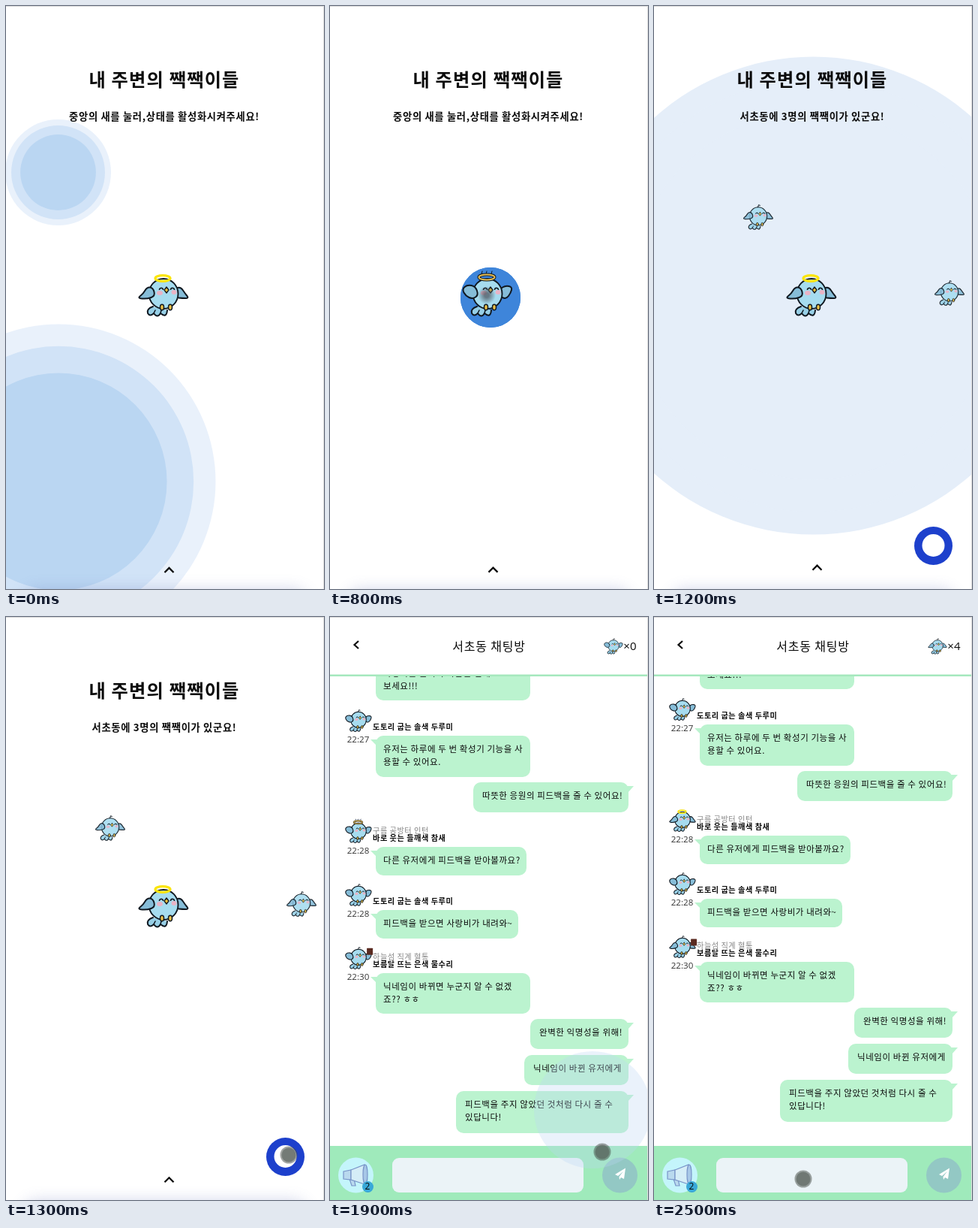
Animation, 424 px wide and 776 px high, one loop 2.6 s. Source, as an HTML page with a canvas:

```html
<!DOCTYPE html>
<html lang="ko">
<head>
<meta charset="utf-8">
<style>
  html, body { margin: 0; width: 100%; height: 100%; overflow: hidden; background: #fff; }
  canvas { display: block; width: 100vw; height: 100vh; }
</style>
</head>
<body>
<canvas id="stage" width="424" height="776"></canvas>
<script>
const ctx = document.getElementById('stage').getContext('2d');
const W = 424, H = 776, LOOP = 2600, STEP = 100;
const HANGUL = '"Noto Sans CJK KR", "Noto Sans CJK", "Noto Sans", sans-serif';
const LATIN = '"Open Sans", "Noto Sans", sans-serif';
const INK = '#0b0b0b', MINT = '#9feabb', BUBBLE = '#bbf3cf', WHITE = [255, 255, 255];

const clamp = v => Math.max(0, Math.min(1, v));
const lerp = (a, b, p) => a + (b - a) * p;
const blend = (a, b, p) => a.map((v, i) => lerp(v, b[i], p));
const rgb = c => `rgb(${c.map(Math.round).join(',')})`;
const easeOut = (p, n) => 1 - Math.pow(1 - p, n);

function disc(x, y, r, fill) {
  ctx.beginPath();
  ctx.arc(x, y, r, 0, Math.PI * 2);
  ctx.fillStyle = fill;
  ctx.fill();
}

function box(x, y, w, h, r, fill) {
  ctx.beginPath();
  ctx.roundRect(x, y, w, h, r);
  ctx.fillStyle = fill;
  ctx.fill();
}

function path(points, fill, stroke, width = 1) {
  ctx.beginPath();
  points.forEach(([x, y]) => ctx.lineTo(x, y));
  if (fill) { ctx.closePath(); ctx.fillStyle = fill; ctx.fill(); }
  if (stroke) { ctx.strokeStyle = stroke; ctx.lineWidth = width; ctx.stroke(); }
}

// Closed smooth outline through the midpoints of the given corners
function blob(points, fill, stroke, width) {
  const mid = (a, b) => [(a[0] + b[0]) / 2, (a[1] + b[1]) / 2];
  ctx.beginPath();
  ctx.moveTo(...mid(points[points.length - 1], points[0]));
  points.forEach((p, i) => ctx.quadraticCurveTo(...p, ...mid(p, points[(i + 1) % points.length])));
  ctx.closePath();
  ctx.fillStyle = fill;
  ctx.fill();
  ctx.strokeStyle = stroke;
  ctx.lineWidth = width;
  ctx.stroke();
}

function oval(x, y, rx, ry, turn, fill, stroke, width = 2) {
  ctx.beginPath();
  ctx.ellipse(x, y, rx, ry, turn, 0, Math.PI * 2);
  if (fill) { ctx.fillStyle = fill; ctx.fill(); }
  if (stroke) { ctx.strokeStyle = stroke; ctx.lineWidth = width; ctx.stroke(); }
}

function text(str, x, y, size, { weight = 500, color = INK, align = 'left', font = HANGUL } = {}) {
  ctx.font = `${weight} ${size}px ${font}`;
  ctx.letterSpacing = font === HANGUL ? `${size * 0.05}px` : '0px';
  ctx.textAlign = align;
  ctx.textBaseline = 'alphabetic';
  ctx.fillStyle = color;
  ctx.fillText(str, x, y + size * 0.38);
}

function bird(x, y, scale, up, { halo = false, book = false, alpha = 1 } = {}) {
  const line = '#101820', body = '#a6dcef', wing = '#86bdd8', tail = '#97cfe6';
  ctx.save();
  ctx.globalAlpha = alpha;
  ctx.translate(x, y);
  ctx.scale(scale, scale);
  ctx.lineJoin = ctx.lineCap = 'round';

  // Tail with scalloped edge
  ctx.beginPath();
  ctx.moveTo(-14, 15);
  ctx.quadraticCurveTo(-23, 18, -21, 24);
  ctx.quadraticCurveTo(-18, 29, -13, 24);
  ctx.quadraticCurveTo(-8, 31, -4, 24);
  ctx.quadraticCurveTo(4, 31, 5, 20);
  ctx.fillStyle = tail;
  ctx.fill();
  ctx.strokeStyle = line;
  ctx.lineWidth = 2;
  ctx.stroke();
  path([[-13, 24], [-11, 20]], null, line, 1.6);
  path([[-4, 24], [-3, 20]], null, line, 1.6);

  if (up) blob([[16, -8], [24, -13], [33, -11], [31, -3], [25, 5], [17, 2]], wing, line, 2);
  else blob([[15, -9], [23, -11], [29, -2], [34, 4], [25, 4], [16, 3]], wing, line, 2);
  oval(0, -2, 19.5, 20, 0, body, line, 1.9);
  if (up) blob([[-16, -12], [-27, -14], [-34, -8], [-29, 1], [-20, 5], [-12, 0]], wing, line, 2);
  else blob([[-14, -10], [-22, -11], [-27, -2], [-35, 4], [-22, 5], [-11, 1]], wing, line, 2);

  oval(-5, -3, 4, 3, 0, '#e9b4c6');
  oval(14, -4, 3.5, 3, 0, '#e9b4c6');
  ctx.strokeStyle = line;
  ctx.lineWidth = 1.7;
  for (const ex of [-3, 12]) {
    ctx.beginPath();
    ctx.arc(ex, -7, 2.6, Math.PI * 1.1, Math.PI * 1.9);
    ctx.stroke();
  }
  path([[4, -11], [7, -7], [4, -3], [1, -7], [4, -11]], '#e9bd3d', line, 1.3);
  for (const fx of [-2, 9]) oval(fx, 16, 2.5, 3.7, 0, '#edc349', line, 1.5);

  if (halo) {
    if (up) {
      for (const hx of [-8, -2, 5]) path([[hx, -28], [hx + 1, -32]], null, line, 1);
      oval(-1, -24, 10.5, 3.6, 0, null, line, 4);
      oval(-1, -24, 10.5, 3.6, 0, null, '#e6bd54', 2);
    } else {
      oval(-1, -22.5, 10, 3.8, 0, null, '#fbe50d', 3.2);
    }
  } else {
    path([[-1, -22], [1, -27], [4, -26]], null, line, 1.8);
  }
  if (book) box(21, up ? -25 : -20, 15, 17, 1, '#5a2a20');
  ctx.restore();
}

function cursor(x, y, soft) {
  if (soft) {
    const g = ctx.createRadialGradient(x, y, 3, x, y, 12);
    g.addColorStop(0, 'rgba(85,95,105,.8)');
    g.addColorStop(1, 'rgba(85,95,105,0)');
    disc(x, y, 12, g);
  } else {
    disc(x, y, 11.5, 'rgba(70,75,70,.5)');
    disc(x, y, 9.5, 'rgba(85,95,88,.6)');
  }
}

function rings(x, y, radii, colors) {
  radii.forEach((r, i) => disc(x, y, r, rgb(colors[i])));
}

// Home: ripples, title, birds nearby
const PALE = [[233, 241, 251], [209, 227, 247], [186, 214, 242]];
const VIVID = [[196, 219, 243], [130, 182, 229], [76, 148, 221]];
const SPARK = [62, 133, 218], MIST = [229, 238, 249];

function idleRipples(t) {
  const p = clamp(t / 600);
  if (p >= 1) return;
  const colors = PALE.map(c => blend(c, WHITE, p));
  const big = 209.5 + 18 * p, small = 70.5 + 53 * p;
  rings(70, 633, [big, big * 0.86, big * 0.69], colors);
  rings(69.5, 221.5, [small, small * 0.886, small * 0.715], colors);
}

function activeRipple(t) {
  if (t < 800 || t >= 1300) return;
  const p = clamp((t - 800) / 400);
  const radii = [[278, 2.42], [248, 1.92], [205, 1.43]].map(([d, n]) => 40 + d * easeOut(p, n));
  const colors = VIVID.map(c => t < 1000
    ? blend(SPARK, c, (t - 800) / 200)
    : blend(c, MIST, clamp((t - 1000) / 200)));
  const drift = clamp(p * 2);
  rings(lerp(214, 212.5, drift), lerp(388, 385.5, drift), radii, colors);
}

function home(t) {
  idleRipples(t);
  activeRipple(t);

  const shown = clamp((t - 850) / 350);
  const up = Math.floor((t + 150) / 300) % 2 === 1;
  const heading = { weight: 700, align: 'center' };
  text('내 주변의 짹짹이들', 211, 97.5, 24.2, heading);
  text(t < 900 ? '중앙의 새를 눌러,상태를 활성화시켜주세요!' : '서초동에 3명의 짹짹이가 있군요!',
    211, 146.5, 13.3, heading);

  if (shown > 0) {
    bird(139, 281, 0.6, false, { alpha: shown * 0.9 });
    bird(394, 382, 0.6, false, { alpha: shown * 0.9 });
    ctx.globalAlpha = shown * shown;
    disc(372.5, 718.5, 25.5, '#1d40cc');
    disc(372.5, 718, 15, '#fff');
    ctx.globalAlpha = 1;
  }
  bird(210, 385, 1, up, { halo: true });
  if (t >= 700 && t < 1100) cursor(209, 385, true);
  if (t >= 1300) cursor(377, 716);

  ctx.save();
  ctx.shadowColor = 'rgba(110,120,190,.32)';
  ctx.shadowBlur = 20;
  box(22, 777, 380, 40, 20, '#fff');
  ctx.restore();

  const cy = 749 - 2 * Math.cos((t - 1100) / 733 * Math.PI * 2);
  path([[211.5, cy + 3], [217.5, cy - 3], [223.5, cy + 3]], null, INK, 2.3);
}

// Chat room
const CHAT = [
  { y: 57, h: 54, w: 206, lines: ['확성기를 눌러서 마음을 전해', '보세요!!!'] },
  { y: 158, h: 55, w: 206, name: '도토리 굽는 솔색 두루미', time: '22:27',
    lines: ['유저는 하루에 두 번 확성기 기능을 사', '용할 수 있어요.'] },
  { y: 220, h: 40, w: 207, mine: true, lines: ['따뜻한 응원의 피드백을 줄 수 있어요!'] },
  { y: 306, h: 38, w: 201, name: '바로 웃는 들깨색 참새', rank: '구름 공방터 인턴', time: '22:28',
    look: { halo: true }, lines: ['다른 유저에게 피드백을 받아볼까요?'] },
  { y: 390, h: 38, w: 190, name: '도토리 굽는 솔색 두루미', time: '22:28',
    lines: ['피드백을 받으면 사랑비가 내려와~'] },
  { y: 474, h: 54, w: 206, name: '보름달 뜨는 은색 물수리', rank: '하늘섬 직계 혈통', time: '22:30',
    look: { book: true }, lines: ['닉네임이 바뀌면 누군지 알 수 없겠', '죠?? ㅎㅎ'] },
  { y: 535, h: 40, w: 131, mine: true, lines: ['완벽한 익명성을 위해!'] },
  { y: 583, h: 40, w: 139, mine: true, lines: ['닉네임이 바뀐 유저에게'] },
  { y: 631, h: 56, w: 230, mine: true, lines: ['피드백을 주지 않았던 것처럼 다시 줄 수', '있답니다!'] },
];

function message(m, up) {
  const x = m.mine ? 398 - m.w : 61;
  box(x, m.y, m.w, m.h, 10, BUBBLE);
  path(m.mine
    ? [[390, m.y + 5], [405, m.y + 5], [397, m.y + 14]]
    : [[54, m.y + 5], [68, m.y + 5], [62, m.y + 13]], BUBBLE);
  m.lines.forEach((s, i) => text(s, x + (m.mine ? 12 : 10), m.y + 18 + i * 17, 11.5));
  if (!m.name) return;
  bird(38, m.y - 20, 0.53, m.look ? up : true, m.look);
  if (m.rank) text(m.rank, 57, m.y - 22, 10.2, { color: '#858585' });
  text(m.name, 57, m.y - 11.5, 10.2, { weight: 700 });
  text(m.time, 37.5, m.y + 5, 11.6, { weight: 400, color: '#333', align: 'center', font: LATIN });
}

function megaphone() {
  const line = '#7894c8', fill = '#b9d9ee';
  path([[26, 748], [32, 748], [34, 757], [29, 757], [26, 748]], fill, line, 1.2);
  path([[18, 738], [28, 736], [28, 749], [18, 748], [18, 738]], fill, line, 1.2);
  path([[28, 736], [46, 729], [46, 755], [28, 749], [28, 736]], '#d5edf7', line, 1.2);
  oval(47, 742, 3, 13, 0, '#a7c7e7', line, 1.2);
}

function chat(t) {
  const up = Math.floor(t / 200) % 2 === 1;
  if (t >= 1700) {
    ctx.save();
    ctx.beginPath();
    ctx.rect(0, 78, W, 626);
    ctx.clip();
    ctx.translate(0, -15 * easeOut(clamp((t - 1900) / 400), 2));
    CHAT.forEach(m => message(m, up));
    ctx.restore();
  }

  box(0, 76.5, W, 2.5, 0, '#a5e8bd');
  path([[38, 32], [32.5, 37], [38, 42]], null, INK, 2.2);
  text('서초동 채팅방', 212, 38.5, 16, { align: 'center' });
  bird(378, 39, 0.38, up || t < 1700);
  text('×' + (t < 2300 ? 0 : 4), 408.5, 38, 15, { align: 'right', font: LATIN });

  box(0, 704, W, 72, 0, MINT);
  disc(34.5, 743, 23.5, '#c4f5fb');
  if (t >= 1700) megaphone();
  disc(50.5, 758.5, 7.5, '#39a8d8');
  text('2', 50, 757.5, 12, { weight: 400, align: 'center', font: LATIN });
  box(83, 720, 255, 46, 9, '#ebf3f7');
  disc(386.5, 743, 23.5, '#93c8c4');
  path([[394, 733.5], [380, 742], [384, 744], [391, 738], [385.5, 745], [386, 749], [388, 746], [392, 748]], '#fff');

  if (t >= 1800 && t < 2200) {
    const p = (t - 1800) / 400;
    const alpha = 0.3 * (1 - Math.max(0, p - 0.25) / 0.75);
    disc(350, 656, 48 + 57 * easeOut(p, 2.6), `rgba(185,213,242,${alpha})`);
  }
  const near = clamp((t - 1600) / 300), p = clamp((t - 1900) / 500), far = p * p * (3 - 2 * p);
  cursor(lerp(lerp(377, 363, near), 199, far), lerp(lerp(716, 712, near), 748, far));

  if (t < 1700) {
    box(-4, 760, 142, 24, 4, '#c3c8c8');
    box(-4, 761, 141, 24, 3, '#dfe1e5');
    text('api.pebbrin-tavolk.org...', 3, 771, 11.3, { weight: 400, color: '#4a4d50', font: LATIN });
  }
}

function draw(t) {
  ctx.globalAlpha = 1;
  ctx.lineJoin = 'miter';
  ctx.lineCap = 'butt';
  ctx.fillStyle = '#fff';
  ctx.fillRect(0, 0, W, H);
  (t < 1500 ? home : chat)(t);
  ctx.fillStyle = '#dcdcdc';
  ctx.fillRect(0, 0, W, 1);
  ctx.fillRect(W - 1, 0, 1, H);
}

const start = performance.now();
function tick() {
  const t = (performance.now() - start) % LOOP;
  draw(Math.floor(t / STEP) * STEP);
  requestAnimationFrame(tick);
}
tick();
</script>
</body>
</html>
```
